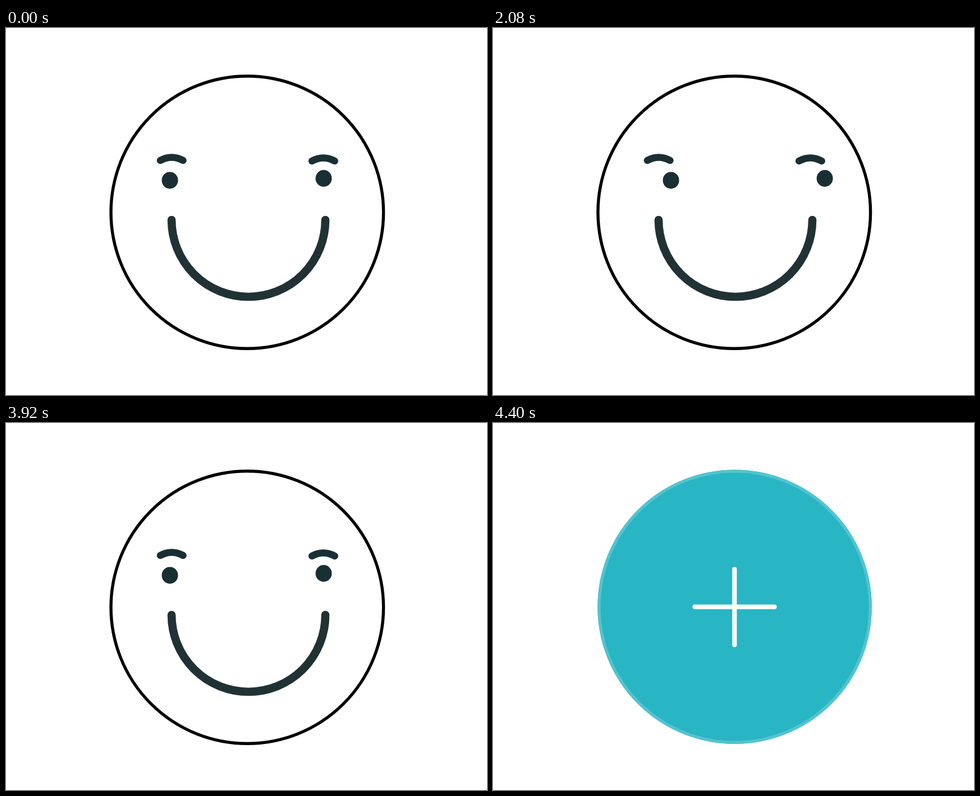
These frames come from a looping animation (857 by 654 pixels, 9.2 s). An HTML page with a canvas:

```html
<!DOCTYPE html>
<html lang="en">
<head>
<meta charset="utf-8">
<title>Smile to plus</title>
<style>
  html, body { margin: 0; width: 100%; height: 100%; overflow: hidden; background: #fff; }
  canvas { display: block; }
</style>
</head>
<body>
<canvas id="stage" width="857" height="654"></canvas>
<script>
const ctx = document.getElementById('stage').getContext('2d');
const LOOP = 9200, STEP = 80;
const BLACK = [0, 0, 0], INK = [26, 47, 51], MOUTH = [33, 50, 52];
const TEAL = [40, 181, 196], RIM = [84, 195, 206];

const rgb = c => `rgb(${c.map(Math.round).join(',')})`;
const lerp = (a, b, k) => a + (b - a) * k;
const mix = (a, b, k) => rgb(a.map((v, i) => lerp(v, b[i], k)));
const progress = (t, from, to) => Math.min(1, Math.max(0, (t - from) / (to - from)));
const smooth = p => p * p * (3 - 2 * p);
const ease = (t, from, to) => smooth(progress(t, from, to));

function stroke(color, width, cap = 'round') {
  ctx.strokeStyle = color;
  ctx.lineWidth = width;
  ctx.lineCap = cap;
  ctx.stroke();
}

function ring(x, y, r, color, width) {
  ctx.beginPath();
  ctx.arc(x, y, r, 0, Math.PI * 2);
  stroke(color, width);
}

function eye(x, y) {
  ctx.beginPath();
  ctx.ellipse(x, y, 14.5, 15, 0, 0, Math.PI * 2);
  ctx.fillStyle = rgb(INK);
  ctx.fill();
}

function brow(x, y) {
  ctx.beginPath();
  ctx.moveTo(x - 20.2, y);
  ctx.quadraticCurveTo(x, y - 11, x + 20.2, y);
  stroke(rgb(INK), 12.6);
}

function gaze(t) {
  if (t < 1200) return -19.5 * ease(t, 480, 840);
  if (t < 1840) return lerp(-19.5, 32, ease(t, 1200, 1640));
  return 32 * (1 - ease(t, 1840, 2640));
}

function mouth(left) {
  const middle = Math.PI / 2 - 0.02 * (1 - left);
  const half = Math.PI / 2 * left;
  ctx.beginPath();
  ctx.arc(432, 342, 137, middle - half, middle + half);
  stroke(mix(MOUTH, TEAL, 1 - left), 14.6, left < 1 ? 'butt' : 'round');
}

function face(t, left) {
  const gone = 1 - left;
  ring(lerp(429.8, 430.6, gone), lerp(328.5, 327.7, gone), lerp(242.8, 241.6, gone),
    mix(BLACK, RIM, gone), 5.4);
  const dx = gaze(t);
  const lift = 26 * (ease(t, 3280, 3560) - ease(t, 3580, 3880));
  ctx.globalAlpha = left < 0.05 ? 0 : left;
  eye(292 + dx, 271.4);
  eye(566 + dx, 268);
  brow(295.2, 236 - lift);
  brow(565.4, 237);
  ctx.globalAlpha = 1;
  mouth(left);
}

// Size of the growing disc, 0 to 1.
function discScale(t) {
  const p = progress(t, 4080, 4400);
  return lerp(p, smooth(p), 0.2);
}

function discRim(x, y, scale) {
  ring(x, y, 241.6 * scale, rgb(RIM), 5.4 * scale);
}

function button(t) {
  const scale = discScale(t);
  if (!scale) return;
  const x = lerp(428.4, 430.6, scale), y = lerp(327.3, 327.6, scale);
  ctx.beginPath();
  ctx.arc(x, y, 241.6 * scale, 0, Math.PI * 2);
  ctx.fillStyle = rgb(TEAL);
  ctx.fill();
  // Earlier rims stay faintly visible while the disc grows.
  if (scale < 1) {
    ctx.globalAlpha = 0.7;
    for (let s = 4160; s < t; s += STEP) discRim(x, y, discScale(s));
    ctx.globalAlpha = 1;
  }
  discRim(x, y, scale);
  ctx.beginPath();
  ctx.moveTo(359.6, 327.7);
  ctx.lineTo(501.4, 327.7);
  ctx.moveTo(430.3, 260.6);
  ctx.lineTo(430.3, 395.4);
  stroke('#fff', 8.2);
}

function draw(now) {
  const t = Math.floor((now % LOOP) / STEP) * STEP;
  ctx.fillStyle = '#fff';
  ctx.fillRect(0, 0, 857, 654);
  const left = Math.pow(1 - progress(t, 4000, 4320), 2.5);
  face(t, left);
  button(t);
}

const start = performance.now();
function tick() {
  draw(performance.now() - start);
  requestAnimationFrame(tick);
}
tick();
</script>
</body>
</html>
```
